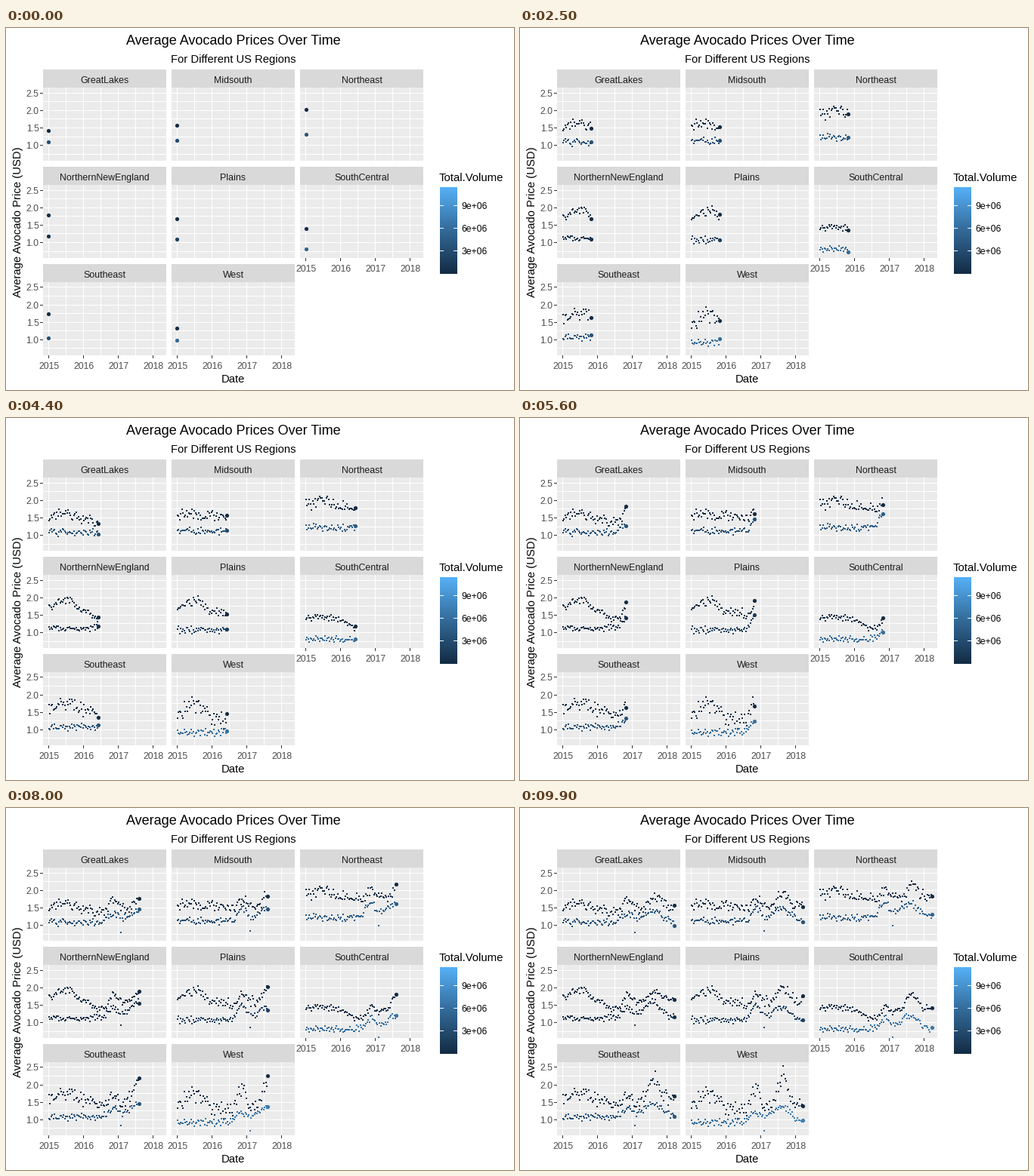
Write a matplotlib script that moves like this. It is 672 by 480 pixels and loops after 10 s.

```python
import numpy as np
import matplotlib.pyplot as plt
from matplotlib.animation import FuncAnimation
from matplotlib.colors import LinearSegmentedColormap
from matplotlib.patches import Rectangle

W, H, DPI = 672, 480, 96
FRAMES, INTERVAL = 100, 100
PX = 72 / DPI

COL_STEP, ROW_STEP = 170.1, 129
LEFT, STRIP_TOP, STRIP_H = 49.3, 55, 24
PANEL_W, PANEL_H = 162.8, 97.6
FIRST_X, STEP_X = 56.8, 1.495
YEAR_X, YEAR_PX = 56.2, 45.94
ONE_Y, PRICE_PX = 155.6, 46.3

cmap = LinearSegmentedColormap.from_list("vol", ["#132B43", "#336A98", "#56B1F7"])
MAX_VOLUME = 11.35

# name: volume, noise, organic (base, 2015, 2016 slump, two autumns),
# regular (base, two autumns)
REGIONS = {
    "GreatLakes": (3.3, 0.08, (1.53, 0.07, -0.18, 0.38, 0.30), (1.08, 0.28, 0.36)),
    "Midsouth": (2.9, 0.08, (1.57, 0.04, -0.10, 0.25, 0.42), (1.12, 0.33, 0.36)),
    "Northeast": (4.2, 0.09, (1.84, 0.14, -0.10, 0.20, 0.28), (1.23, 0.42, 0.40)),
    "NorthernNewEngland": (0.5, 0.05, (1.68, 0.25, -0.32, 0.40, 0.22), (1.13, 0.30, 0.45)),
    "Plains": (1.7, 0.08, (1.65, 0.24, -0.12, 0.25, 0.38), (1.07, 0.40, 0.38)),
    "SouthCentral": (5.6, 0.05, (1.41, 0.03, -0.32, 0.30, 0.40), (0.80, 0.32, 0.40)),
    "Southeast": (3.4, 0.10, (1.61, 0.16, -0.20, 0.30, 0.60), (1.07, 0.30, 0.38)),
    "West": (6.0, 0.12, (1.40, 0.30, -0.18, 0.70, 0.90), (0.93, 0.28, 0.45)),
}

plt.rcParams["font.family"] = "Liberation Sans"
rng = np.random.default_rng(15)
t = np.arange(FRAMES)

fig = plt.figure(figsize=(W / DPI, H / DPI), dpi=DPI, facecolor="white")
ax = fig.add_axes([0, 0, 1, 1])
ax.axis("off")


def box(x0, y0, x1, y1, color):
    ax.add_patch(Rectangle((x0, y0), x1 - x0, y1 - y0, fc=color, lw=0,
                           antialiased=False))


def hline(x0, x1, y, color="white"):
    box(x0, int(y), x1, int(y) + 1, color)


def vline(x, y0, y1, color="white"):
    box(int(x), y0, int(x) + 1, y1, color)


def label(x, y, s, px, color="black", ha="center", **kw):
    ax.text(x, y, s, fontsize=px * PX, color=color, ha=ha, va="baseline", **kw)


def year_x(col, year):
    return YEAR_X + COL_STEP * col + (year - 2015) * YEAR_PX


def price_y(row, price):
    return ONE_Y + (ROW_STEP - 0.1) * row - (price - 1) * PRICE_PX


def bump(center, width, power=2):
    return np.exp(-np.abs((t - center) / width) ** power)


def organic_price(base, early, slump, autumn16, autumn17):
    return (base + early * bump(14, 10, 4) + slump * bump(50, 16)
            + autumn16 * bump(57, 5) + autumn17 * bump(81, 6))


def regular_price(base, autumn16, autumn17):
    dip = 0.4 * (t == 64)
    return base + autumn16 * bump(57, 6) + autumn17 * bump(79, 11) - dip


def jitter(size):
    return np.clip(rng.normal(0, size, FRAMES), -2 * size, 2 * size)


def draw_panel(name, row, col):
    left = int(LEFT + COL_STEP * col)
    right = int(LEFT + COL_STEP * col + PANEL_W)
    strip = STRIP_TOP + ROW_STEP * row
    top = strip + STRIP_H
    bottom = int(top + PANEL_H)
    box(left, strip, right, top, "#D9D9D9")
    box(left, top, right, bottom, "#EBEBEB")
    label((left + right) / 2, strip + 18, name, 12.4, "#1A1A1A")
    for price in np.arange(0.75, 2.6, 0.25):
        hline(left, right, price_y(row, price))
    for year in np.arange(2015, 2018.3, 0.5):
        vline(year_x(col, year), top, bottom)


# Panels and their two series
xs, ys, vols = [], [], []
for i, (name, (volume, noise, organic, regular)) in enumerate(REGIONS.items()):
    row, col = divmod(i, 3)
    draw_panel(name, row, col)
    lines = ((organic_price(*organic) + jitter(noise), 0.12),
             (regular_price(*regular) + jitter(0.055), volume))
    for price, vol in lines:
        xs.append(FIRST_X + COL_STEP * col + STEP_X * t)
        ys.append(price_y(row, price))
        vols.append(vol * (0.95 + 0.25 * t / FRAMES))

# Axes
GREY, TICK = "#4D4D4D", "#333333"
for row in range(3):
    for price in (1.0, 1.5, 2.0, 2.5):
        y = price_y(row, price)
        hline(45, 49, y, TICK)
        label(43.5, int(y) + 5, f"{price:.1f}", 12.1, GREY, ha="right")
for col, bottom in enumerate((434, 434, 305)):
    for year in range(2015, 2019):
        x = year_x(col, year)
        vline(x, bottom, bottom + 4, TICK)
        label(int(x) + 0.5, bottom + 18, str(year), 12.2, GREY)

label(300.8, 22, "Average Avocado Prices Over Time", 18)
label(300.5, 46, "For Different US Regions", 14.7)
label(300.5, 470, "Date", 14.7)
label(20, 257.5, "Average Avocado Price (USD)", 14.9,
      rotation=90, rotation_mode="anchor")

# Colour bar
label(573, 203, "Total.Volume", 14.9, ha="left")
ax.imshow(np.linspace(1, 0, 256)[:, None], cmap=cmap, aspect="auto",
          extent=(574, 597, 326, 211), interpolation="bilinear")
for millions in (3, 6, 9):
    y = 326.4 - millions * 10.15
    hline(574, 579, y)
    hline(592, 597, y)
    label(602.5, int(y) + 5, f"{millions}e+06", 12.2, ha="left")
ax.set_xlim(0, W)
ax.set_ylim(H, 0)

# One mark per series and step, ordered by time
marks = np.stack([np.array(xs).T, np.array(ys).T], axis=-1)
colors = cmap(np.array(vols).T / MAX_VOLUME)
trail = ax.scatter([], [], s=(2 * PX) ** 2, marker="s", linewidths=0,
                   antialiased=False, zorder=3)
heads = ax.scatter([], [], s=(5.2 * PX) ** 2, linewidths=0, zorder=4)


def update(i):
    trail.set_offsets(np.round(marks[:i]).reshape(-1, 2))
    trail.set_facecolors(colors[:i].reshape(-1, 4))
    heads.set_offsets(np.floor(marks[i]) + 0.5)
    heads.set_facecolors(colors[i])
    return trail, heads


anim = FuncAnimation(fig, update, frames=FRAMES, interval=INTERVAL,
                     repeat=True, repeat_delay=0)
plt.show()
```
